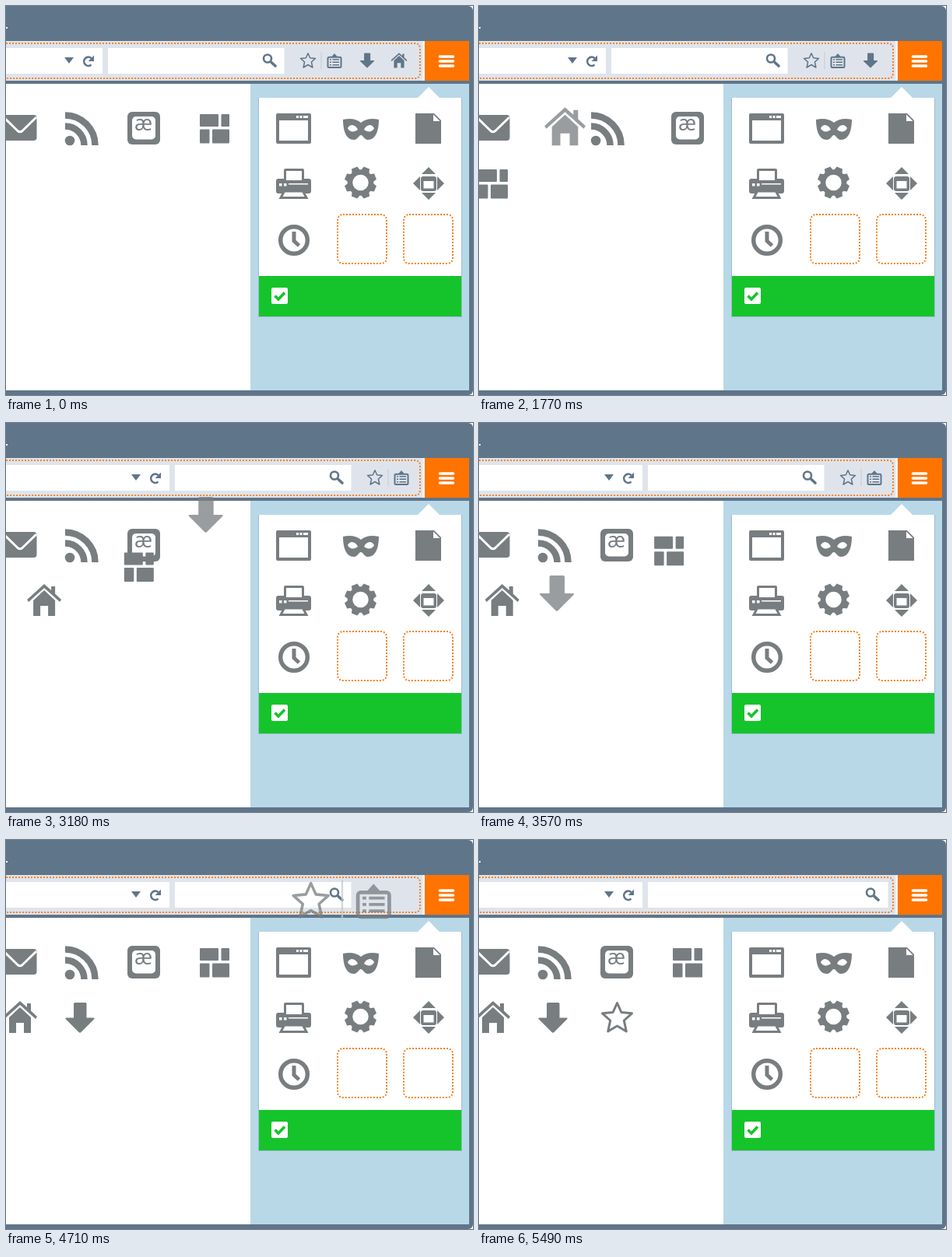
Recreate the animation shown at these times as an HTML page. Size 600 px wide and 500 px high, loop 8.59 s.

```html
<!DOCTYPE html>
<html lang="en">
<head>
<meta charset="utf-8">
<title>Customize toolbar</title>
<style>
html, body { margin: 0; width: 100%; height: 100%; overflow: hidden; background: #fff; }
svg { display: block; width: 600px; height: 500px; }
.slate { color: #5f7589; }
.gray { color: #787d80; }
.slate *, .gray *, .item * { vector-effect: none; }
.fill { fill: currentColor; }
.line { fill: none; stroke: currentColor; }
.dots { fill: none; stroke: #f58220; stroke-width: 2; stroke-dasharray: 2 2; }
.ae { font: 27px "Open Sans", "Noto Sans", sans-serif; text-anchor: middle; fill: currentColor; }
</style>
</head>
<body>
<svg viewBox="0 0 600 500">
  <defs>
    <g id="home" class="fill">
      <path d="M-22-1 0-21 9-13V-18H14V-8.5L22-1 20 2 0-16-20 2Z"/>
      <path d="M0-13 14 0V20H5V7H-5V20H-14V0Z"/>
    </g>
    <path id="down" class="fill" d="M-8-18q0-1.500 1.500-1.500H7q1.500 0 1.500 1.500V0H17.500q2 0 .7 1.800L1.500 18.500q-1.500 1.500-3 0L-18.200 1.800Q-19.500 0-17.500 0H-8Z"/>
    <path id="star" class="fill line" stroke-width="3" stroke-linejoin="round"
      d="M0-18.500 5.400-6.500 19-5.200 8.800 4 11.800 18 0 11-11.800 18-8.800 4-19-5.200-5.400-6.500Z"/>
    <g id="list">
      <rect class="line" x="-17" y="-9.500" width="34" height="26.500" rx="3" stroke-width="4"/>
      <path class="fill" d="M-8-10 0-19 8-10Z"/>
      <path class="line" stroke-width="3.200" d="M-12-3.500h4m3 0H12M-12 3.500h4m3 0H12M-12 10.500h4m3 0H12"/>
    </g>
    <g id="tiles" class="fill">
      <rect x="-19" y="-18.500" width="24" height="16" rx="1"/>
      <rect x="8.500" y="-18.500" width="10.500" height="16" rx="1"/>
      <rect x="-19" y="1" width="12.500" height="18" rx="1"/>
      <rect x="-3" y="1" width="22" height="18" rx="1"/>
    </g>
  </defs>

  <rect x="-10" width="610" height="500" rx="6" fill="#5f7589"/>
  <rect y="27" width="2" height="2" fill="#fff"/>
  <rect y="45" width="538" height="51" fill="#dfe4ec"/>
  <rect x="535" y="45" width="3" height="51" fill="#f1f3f6"/>
  <rect x="538" y="45" width="57" height="51" fill="#ff7300"/>
  <path d="M557.500 65h17M557.500 71h17M557.500 77h17" stroke="#fff" stroke-width="3.600" stroke-linecap="round"/>
  <rect y="100" width="314" height="394" fill="#fff"/>
  <rect x="314" y="100" width="281" height="394" fill="#b8d8e8"/>

  <rect id="url" y="54" height="33" fill="#fff"/>
  <rect id="search" y="54" height="33" fill="#fff"/>
  <g id="bar" class="slate">
    <path class="fill" d="M75 66H87L81 74Z"/>
    <path class="line" stroke-width="2.600" d="M109.500 75.500A5.600 5.600 0 1 1 109.500 67"/>
    <path class="fill" d="M113 63.500V71H105.500Z"/>
  </g>
  <g id="lens" class="slate">
    <circle class="line" cx="336" cy="67.500" r="5" stroke-width="2.600"/>
    <path class="line" stroke-width="3.600" stroke-linecap="round" d="M341 72.500 346 77"/>
  </g>
  <path class="dots" d="M0 48H525Q532 48 532 55V86Q532 93 525 93H0"/>

  <rect x="324" y="118" width="262" height="282" fill="#9dbdce"/>
  <path fill="#fff" d="M325 118H529L543 104 557 118H585V347H325Z"/>
  <rect x="325" y="347" width="260" height="52" fill="#15c42b"/>
  <rect x="341" y="362" width="21" height="21" rx="2" fill="#fff"/>
  <path d="M345.500 372.500 350 377 358 368.500" fill="none" stroke="#15c42b" stroke-width="3.600"/>
  <rect class="dots" x="426" y="268" width="63" height="63" rx="7"/>
  <rect class="dots" x="511" y="268" width="63" height="63" rx="7"/>

  <g class="gray">
    <path class="fill" fill-rule="evenodd" d="M349 138H390q2 0 2 2V175q0 2-2 2H349q-2 0-2-2V140q0-2 2-2ZM351 147V173H388V147Z"/>
    <path fill="#fff" d="M373 141h3v3h-3zM377.500 141h3v3h-3zM382 141h6v3h-6z"/>

    <path class="fill" fill-rule="evenodd" transform="translate(456 157)" d="M0-7C-6-12-14-13-23-11C-23 3-19 15-9 15C-4 15-3 9 0 9C3 9 4 15 9 15C19 15 23 3 23-11C14-13 6-12 0-7ZM-17 0C-14-6-7-5-4 2C-9 6-15 5-17 0ZM17 0C14-6 7-5 4 2C9 6 15 5 17 0Z"/>

    <path class="fill" d="M526 138H550L559 147V177H526Z"/>
    <path fill="#fff" d="M549 139.500V148H557.500Z"/>

    <path class="fill" fill-rule="evenodd" d="M359 209H381q2 0 2 2V222H389q3 0 3 3V238q0 3-3 3H350q-3 0-3-3V225q0-3 3-3H357V211q0-2 2-2ZM360 212V224H380V212Z"/>
    <path fill="#fff" d="M351 228h3.500v3.500h-3.500zM357 228h3.500v3.500h-3.500zM363 228H388v1.500H363z"/>
    <path d="M357.500 238H381.500L386 246.500H353Z" fill="#fff" stroke="currentColor" stroke-width="3"/>

    <g id="gear" transform="translate(455.500 227)">
      <circle class="line" r="13.500" stroke-width="6.500"/>
    </g>

    <path class="fill" fill-rule="evenodd" d="M543 207 552 216H534ZM543 249 552 240H534ZM523 228 532 219V237ZM563 228 554 219V237ZM536 219H550q3 0 3 3V235q0 3-3 3H536q-3 0-3-3V222q0-3 3-3ZM536.500 225V234.500H549.500V225Z"/>

    <circle class="line" cx="370" cy="301" r="17.300" stroke-width="5.500"/>
    <path class="line" stroke-width="5" d="M370 290V302L376.500 308"/>

    <rect class="fill" x="-4" y="140" width="43.500" height="33" rx="4"/>
    <path d="M-3 143 15 160.500q3 2.500 6 0L39 143" fill="none" stroke="#fff" stroke-width="3"/>

    <g id="rss">
      <circle class="fill" cx="-15.500" cy="15.500" r="6.300"/>
      <path class="line" stroke-width="8.500" d="M-21.500-3A24.500 24.500 0 0 1 3 21.500M-21.500-17A38.500 38.500 0 0 1 17 21.500"/>
    </g>
    <g id="lig">
      <rect class="fill" x="-21" y="-21" width="42" height="42" rx="6"/>
      <rect x="-15" y="-15" width="30" height="29.500" rx="5" fill="#fff"/>
      <text class="ae" x="-.5" y="3">æ</text>
    </g>
    <use id="grid" href="#tiles"/>
  </g>

  <g id="homeItem"><use href="#home"/></g>
  <g id="downItem"><use href="#down"/></g>
  <g id="pair">
    <path id="rule" d="M0-11V11" stroke="#c3cad4"/>
    <use href="#star" transform="translate(-17) scale(.5)"/>
    <use id="listItem" href="#list" transform="translate(17 .5) scale(.5)"/>
  </g>
</svg>
<script>
const LOOP = 8590, STEP = 30;
const SLATE = [95, 117, 137], GRAY = [120, 125, 128];
const el = id => document.getElementById(id);

for (let a = 22.5; a < 360; a += 45) {
  el('gear').insertAdjacentHTML('beforeend',
    `<path class="fill" d="M-5.500-15-4-20.500H4L5.500-15Z" transform="rotate(${a})"/>`);
}

const ramp = (t, a, b) => Math.min(1, Math.max(0, (t - a) / (b - a)));
const ease = (t, a, b) => (1 - Math.cos(Math.PI * ramp(t, a, b))) / 2;
const mix = (a, b, k) => a + (b - a) * k;
const mix2 = (p, q, k) => [mix(p[0], q[0], k), mix(p[1], q[1], k)];
// out and back again
const detour = (t, a, b, c, d) => ease(t, a, b) - ease(t, c, d);

function put(id, [x, y], scale = 1) {
  el(id).setAttribute('transform', `translate(${x.toFixed(2)} ${y.toFixed(2)}) scale(${scale.toFixed(3)})`);
}

// Pick up, carry along a sagging path, settle in the slot
function carry(t, o) {
  const s = ease(t, ...o.move);
  const [a, b, c] = o.bend;
  const sag = a * s + b * s * s + c * s * s * s;
  const up = ramp(t, o.lift - STEP, o.lift + 2 * STEP);
  const drop = ramp(t, ...o.drop);
  const shift = ramp(drop, 0, .6), shrink = ramp(drop, .4, 1);
  const pos = [
    mix(o.from[0], o.over[0], s) + (o.slot[0] - o.over[0]) * shift,
    mix(o.from[1], o.over[1], sag) + (o.slot[1] - o.over[1]) * shift
  ];
  const [small, big, end] = o.sizes;
  return {
    pos, drop,
    scale: mix(mix(small, big, up), end, shrink),
    alpha: 1 - .25 * up + .25 * shrink,
    color: `rgb(${SLATE.map((v, i) => Math.round(mix(v, GRAY[i], up)))})`
  };
}

function show(id, c, offset = 0) {
  put(id, [c.pos[0] + offset, c.pos[1]], c.scale);
  el(id).style.color = c.color;
  el(id).style.opacity = c.alpha;
}

const homeTrip = {
  lift: 900, move: [1097, 2032], drop: [1980, 2100], bend: [.424, -.741, 1.317],
  from: [505, 70], over: [23, 219], slot: [18, 228], sizes: [.47, 1.2, 1]
};
const downTrip = {
  lift: 2460, move: [2700, 3540], drop: [3570, 3720], bend: [.15, .25, .6],
  from: [503, 70], over: [100, 219], slot: [95, 228.5], sizes: [.49, 1.18, 1]
};
const pairTrip = {
  lift: 4230, move: [4455, 5280], drop: [5310, 5490], bend: [.15, .25, .6],
  from: [491, 70], over: [220, 219], slot: [211.5, 228], sizes: [1, 2.37, 2]
};

function draw(t) {
  const s1 = 39 * ramp(t, 1230, 1410);
  const s2 = 47 * ease(t, 2880, 3090);
  const s3 = 82 * ease(t, 4740, 4950);
  const bar = s1 + s2;
  el('url').setAttribute('width', 124 + bar);
  el('search').setAttribute('x', 131 + bar);
  el('search').setAttribute('width', 226.5 + s3);
  put('bar', [bar, 0]);
  put('lens', [bar + s3 * .988, 0]);

  const rss = detour(t, 1612, 1822, 1860, 2070);
  const lig = detour(t, 1545, 1755, 1860, 2085);
  const tiles = detour(t, 1470, 1680, 1860, 2100)
    + detour(t, 3090, 3300, 3330, 3630)
    + detour(t, 4860, 5070, 5130, 5430);
  const home = detour(t, 3090, 3300, 3345, 3645) + detour(t, 4860, 5070, 5145, 5445);
  const down = detour(t, 4860, 5070, 5145, 5445);
  put('rss', [mix(97.5, 177, rss), 157.5]);
  put('lig', [mix(177, 268, lig), 157]);
  put('grid', mix2([268, 157.5], [18, 228.5], tiles));

  show('homeItem', carry(t, homeTrip), 80 * home);
  const d = carry(t, downTrip);
  if (t < downTrip.lift + 180) d.pos[0] = 464 + s1;
  show('downItem', d, 82 * down);
  const p = carry(t, pairTrip);
  if (t < pairTrip.lift) p.pos[0] = 405 + bar;
  show('pair', p);
  el('listItem').style.opacity = el('rule').style.opacity = 1 - p.drop;
}

const start = performance.now();
function frame() {
  const t = (performance.now() - start) % LOOP;
  draw(Math.floor(t / STEP) * STEP);
  requestAnimationFrame(frame);
}
draw(0);
requestAnimationFrame(frame);
</script>
</body>
</html>
```
